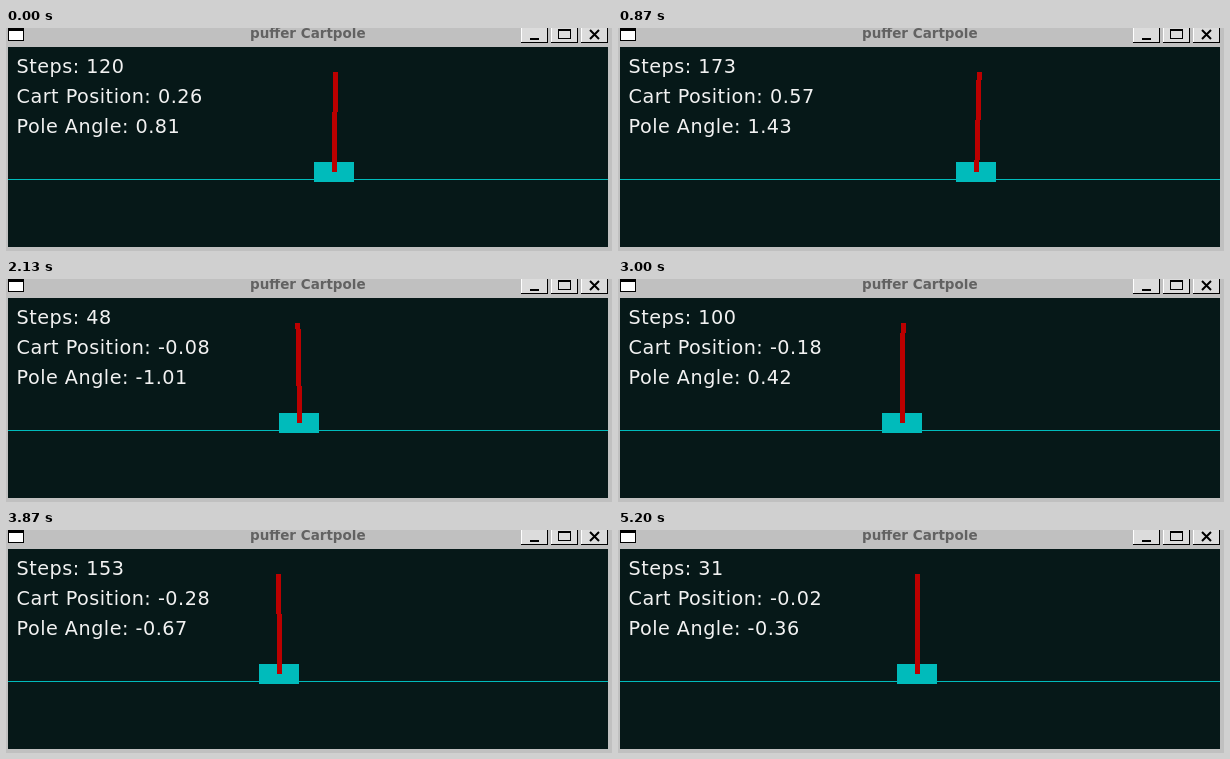
Recreate the animation shown at these times as an HTML page with a canvas. Size 606 by 223 pixels, loop 5270 ms.

```html
<!DOCTYPE html>
<html lang="en">
<head>
<meta charset="utf-8">
<title>Cartpole</title>
<style>
  html, body { margin: 0; width: 606px; height: 223px; overflow: hidden; background: #c0c0c0; }
  canvas { display: block; }
</style>
</head>
<body>
<canvas id="stage" width="606" height="223"></canvas>
<script>
const ctx = document.getElementById('stage').getContext('2d');
const LOOP = 5270, TICKS_PER_MS = 0.015, LAST_TICK = 78, EPISODE = 200;
const SANS = '"DejaVu Sans", sans-serif';

// key poses: tick, total steps, cart position, pole angle in degrees
const poses = [
  [0, 120, 0.2615, 0.81], [13, 173, 0.567, 1.43], [32, 248, -0.0835, -1.01],
  [45, 300, -0.1766, 0.42], [58, 353, -0.283, -0.67], [68, 391, -0.4501, 0.07],
  [LAST_TICK, 431, -0.022, -0.36]
];

const mix = (a, b, u) => a + (b - a) * u;

function stateAt(tick) {
  const i = Math.min(poses.findLastIndex(p => p[0] <= tick), poses.length - 2);
  const a = poses[i], b = poses[i + 1], span = b[0] - a[0];
  const u = (tick - a[0]) / span;
  const total = Math.round(mix(a[1], b[1], u)), steps = total % EPISODE;

  let pos = mix(a[2], b[2], u);
  if (Math.floor(a[1] / EPISODE) < Math.floor(b[1] / EPISODE)) {
    // an episode ends here: run on faster, then drift away from the centre
    const before = poses[i - 1];
    const speed = 1.5 * (a[2] - before[2]) / (a[1] - before[1]);
    pos = total < b[1] - b[1] % EPISODE
      ? a[2] + speed * (total - a[1])
      : b[2] * Math.sqrt(steps / (b[1] % EPISODE));
  }

  // balancing jitter that vanishes at every key pose
  const jitter = 0.6 * Math.sin(Math.PI * Math.round(span * 0.7) * u);
  return { steps, pos, angle: mix(a[3], b[3], u) + jitter };
}

function rect(color, x, y, w, h) {
  ctx.fillStyle = color;
  ctx.fillRect(x, y, w, h);
}

function text(str, x, y, font, color, spacing = '0px') {
  ctx.font = font;
  ctx.letterSpacing = spacing;
  ctx.fillStyle = color;
  ctx.fillText(str, x, y);
}

function button(x) {
  rect('#000', x, 0, 27, 15);
  rect('#fff', x, 0, 26, 14);
  rect('#dcdcdc', x + 1, 0, 25, 14);
}

function drawWindow() {
  rect('#c0c0c0', 0, 0, 606, 223);
  rect('#000', 2, 0, 16, 13);
  rect('#fff', 3, 3, 14, 9);
  text('puffer Cartpole', 244, 10, `bold 13.5px ${SANS}`, '#626262');
  [515, 545, 575].forEach(button);
  rect('#000', 524, 10, 9, 2);
  rect('#000', 552, 1, 13, 10);
  rect('#dcdcdc', 553, 3, 11, 7);
  ctx.strokeStyle = '#000';
  ctx.lineWidth = 2;
  ctx.beginPath();
  ctx.moveTo(584, 2); ctx.lineTo(593, 11);
  ctx.moveTo(593, 2); ctx.lineTo(584, 11);
  ctx.stroke();
}

function drawScene({ steps, pos, angle }) {
  const x = 302 + pos * 100, lean = Math.sin(angle * Math.PI / 180);
  rect('#061818', 2, 19, 600, 200);
  rect('#00bbbb', 2, 151, 600, 1);
  rect('#00bbbb', Math.floor(x) - 20, 134, 40, 20);
  // row by row keeps the pole's edges hard
  for (let y = 44; y < 144; y++) {
    rect('#bb0000', Math.round(x - 2.5 + lean * (143.5 - y)), y, 5, 1);
  }
  [
    `Steps: ${steps}`,
    `Cart Position: ${pos.toFixed(2)}`,
    `Pole Angle: ${angle.toFixed(2)}`
  ].forEach((line, i) =>
    text(line, 10.5, 45 + 30 * i, `19.2px ${SANS}`, '#f1f1f1', '0.5px'));
}

function frame() {
  const tick = Math.floor((performance.now() % LOOP) * TICKS_PER_MS + 0.051);
  drawWindow();
  drawScene(stateAt(Math.min(tick, LAST_TICK)));
  requestAnimationFrame(frame);
}
frame();
</script>
</body>
</html>
```
